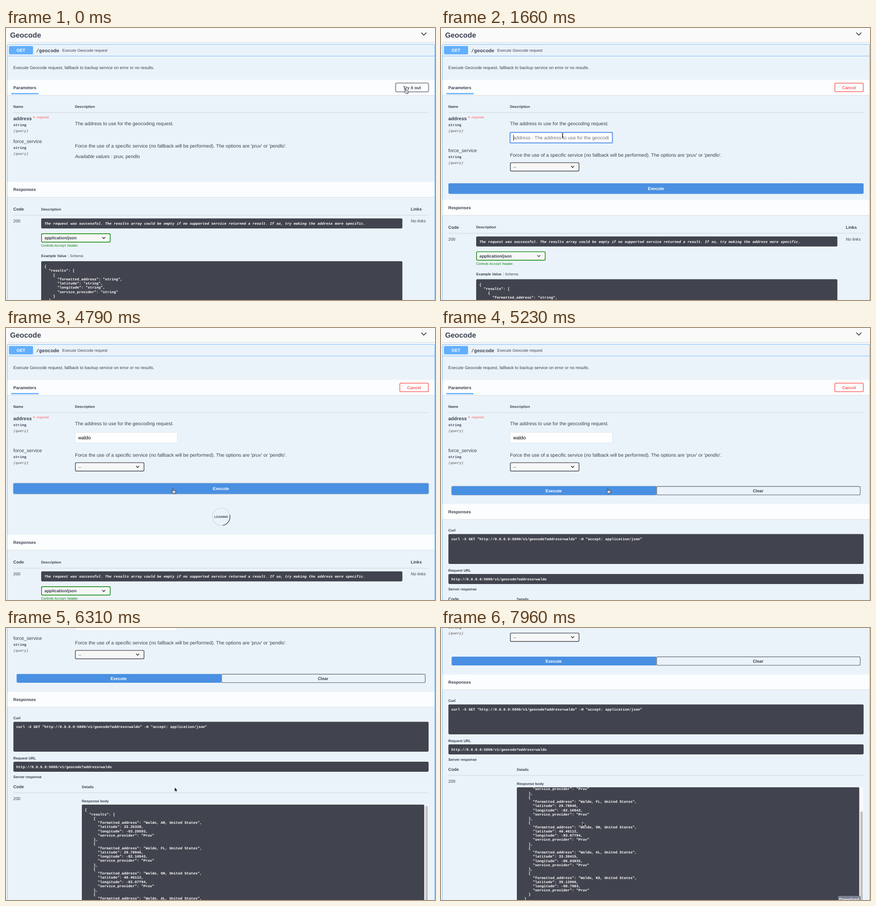
Write an HTML page that moves like this. It is 939x596 px and loops after 8000 ms.

```html
<!DOCTYPE html>
<html lang="en">
<head>
<meta charset="utf-8">
<title>Geocode API docs</title>
<style>
  html, body { margin: 0; width: 100%; height: 100%; overflow: hidden; background: #fafafa; }
  svg { display: block; width: 100%; height: 100%; }
  text { font-family: "Liberation Sans", Arial, sans-serif; fill: #3b4151; white-space: pre; text-rendering: geometricPrecision; }
  .b { font-weight: 700; }
  .i { font-style: italic; }
  .m { font-family: "Liberation Mono", "Courier New", monospace; }
  .c { text-anchor: middle; }
  .white { fill: #fff; }
  .green { fill: #008000; }
  .red { fill: #ff6060; }
  .grey { fill: #808080; }
  .glow { filter: drop-shadow(0 0 1px rgba(40, 50, 70, .55)); }
</style>
</head>
<body>
<svg id="stage" viewBox="0 0 939 596"></svg>
<script>
const LOOP = 8000;
const TINY = 7.26, SMALL = 7.92, BASE = 9.24, LARGE = 10.56, LEAD = 9.24;
const INK = '#3b4151', BLUE = '#61affe', ACTION = '#4990e2', SLATE = '#41444e';

// y is the middle of the capitals
const text = (x, y, str, size = BASE, cls = '') =>
  `<text x="${x}" y="${(y + size * 0.36).toFixed(2)}" font-size="${size}" class="${cls}">${str}</text>`;
const box = (x, y, w, h, fill, extra = '') =>
  `<rect x="${x}" y="${y}" width="${w}" height="${h}" fill="${fill}" ${extra}/>`;
const round = (x, y, w, h, fill, stroke = 'none', sw = 1.3) =>
  box(x, y, w, h, fill, `rx="2.4" stroke="${stroke}" stroke-width="${sw}"`);
const rule = (y, color = 'rgba(59,65,81,.22)', x1 = 16, x2 = 925) =>
  box(x1, y, x2 - x1, 0.8, color);
const chevron = (x, y, w, h, sw) =>
  `<path d="M${x - w} ${y - h}L${x} ${y + h}L${x + w} ${y - h}" fill="none" stroke="#222" stroke-width="${sw}" stroke-linecap="round" stroke-linejoin="round"/>`;
const code = (x, y, lines) =>
  lines.map((line, i) => text(x, y + i * LEAD, line, SMALL, 'm b white')).join('');
const group = (id, body, attrs = '') => `<g id="${id}" ${attrs}>${body}</g>`;

const section = (y, title) =>
  box(3.2, y, 934.6, 33.6, '#fbfdfe') + rule(y + 33.4, 'rgba(0,0,0,.13)', 3.2, 937.8) +
  text(16, y + 16.8, title, BASE, 'b');

const param = (y, name, cls = '') =>
  text(16, y, name, LARGE, cls) + text(16, y + 14.2, 'string', SMALL, 'm b') +
  text(16, y + 27, '(query)', SMALL, 'm b i grey');

const select = (y, label, x, stroke, cls) =>
  round(x + 0.7, y - 9.2, 150.4, 18.4, '#f7f7f7', stroke, 1.4) +
  text(x + 7.3, y, label, BASE, cls) + chevron(x + 137, y, 2.9, 1.5, 1.3);

const forceService = y =>
  param(y, 'force_service') +
  text(151, y + 10.6, "Force the use of a specific service (no fallback will be performed). The options are 'pruv' or 'pendlo'.", LARGE);

const button = (x, y, w, label, color, ink) =>
  round(x, y, w, 18.8, 'none', color, 1.5) + text(x + w / 2, y + 9.4, label, BASE, 'b c ' + ink);

const SAMPLE = [
  '{', '  "results": [', '    {',
  '      "formatted_address": "string",', '      "latitude": "string",',
  '      "longitude": "string",', '      "service_provider": "string"',
  '    }', '  ]', '}'];

const responses = y => `<g transform="translate(0 ${y})">` +
  section(0, 'Responses') +
  text(16, 60, 'Code', BASE, 'b') + text(77, 60, 'Description', SMALL, 'b') + text(886, 60, 'Links', BASE, 'b') +
  rule(72.8) + text(16, 85.6, '200') + text(886, 85.6, 'No links', BASE, 'i') +
  round(77, 80.2, 790.6, 22, SLATE) +
  text(84, 91.6, 'The request was successful. The results array could be empty if no supported service returned a result. If so, try making the address more specific.', SMALL, 'm b i white') +
  select(123, 'application/json', 77, '#008000', 'b') +
  text(77, 139.6, 'Controls <tspan class="m">Accept</tspan> header.', TINY, 'green') +
  text(77, 162.4, 'Example Value', SMALL, 'b') + box(136, 158.5, 0.7, 8, 'rgba(59,65,81,.35)') +
  text(140, 162.4, 'Schema', SMALL) +
  round(77, 174, 790.6, 140, SLATE) + code(84, 185.4, SAMPLE) + '</g>';

const PLACES = [
  ['AR', '33.35338', '-93.29593'], ['FL', '29.78946', '-82.16943'],
  ['OH', '40.46112', '-83.07794'], ['AL', '33.39415', '-86.03835'], ['KS', '39.12006', '-98.7983']];
const ANSWER = ['{', '  "results": [',
  ...PLACES.flatMap(([state, lat, lon], i) => [
    '    {', `      "formatted_address": "Waldo, ${state}, United States",`,
    `      "latitude": ${lat},`, `      "longitude": ${lon},`,
    '      "service_provider": "Pruv"', i < PLACES.length - 1 ? '    },' : '    }']),
  '  ]', '}'];

const common =
  text(9, 14.8, 'Geocode', 15.84, 'b') + chevron(914.5, 13.2, 5, 2.6, 1.5) +
  rule(31, 'rgba(59,65,81,.25)', 3, 939) +
  round(2.9, 35.8, 935.5, 1100, '#ebf3fa', BLUE, 0.9) + rule(61.1, BLUE, 3, 938) +
  round(6.4, 39.4, 52.8, 18.4, BLUE) + text(32.6, 48.6, 'GET', BASE, 'b c white') +
  text(66, 48.9, '/geocode', LARGE, 'm b') + text(123, 48.9, 'Execute Geocode request', 8.58) +
  text(16, 86.4, 'Execute Geocode request, fallback to backup service on error or no results.') +
  section(113.7, 'Parameters') + box(11.5, 142.6, 59.8, 2.7, BLUE) +
  text(16, 172.4, 'Name', SMALL, 'b') + text(151, 172.4, 'Description', SMALL, 'b') + rule(184.8) +
  param(198, 'address', 'b') + text(59.5, 197, '*', BASE, 'b red') + text(67, 195.4, 'required', 7.2, 'red') +
  text(151, 208.8, 'The address to use for the geocoding request.', LARGE);

const docs =
  `<g class="glow">${round(853, 120.8, 71.6, 18.8, '#fbfdfe', '#777c86', 1.3)}</g>` +
  text(888.8, 130.3, 'Try it out', BASE, 'b c') + forceService(248) +
  text(151, 281, '<tspan class="i">Available values</tspan> : pruv, pendlo', LARGE) + responses(337);

const form =
  button(862, 120.8, 62.4, 'Cancel', '#ff6060', 'red') +
  round(151.2, 228.8, 223.8, 23, '#fff', '#d5d9de', 0.7) +
  `<rect id="focus" x="151.2" y="228.8" width="224" height="23" rx="1.5" fill="none" stroke="#5b92ec" stroke-width="2"/>` +
  `<text id="value" x="158" y="243.9" font-size="${LARGE}"></text>` +
  `<rect id="caret" y="234" width="0.9" height="13" fill="#000"/>` +
  forceService(268) + select(304.3, '--', 151, '#41444e', '');

const execute =
  group('execute', round(16.2, 340.2, 908.8, 23.3, ACTION)) + text(470.5, 352, 'Execute', BASE, 'b c white');

const loading =
  `<circle cx="471" cy="413.6" r="19.3" fill="none" stroke="rgba(85,85,85,.17)" stroke-width="1.3"/>` +
  `<path id="arc" d="M490.3 413.6A19.3 19.3 0 0 1 471 432.9" fill="none" stroke="rgba(50,55,65,.85)" stroke-width="1.5"/>` +
  text(471, 413.8, 'LOADING', 6.6, 'b c') + responses(453);

const result =
  group('run', round(23.2, 346.8, 448.4, 19.2, ACTION)) + text(246.5, 356.3, 'Execute', BASE, 'b c white') +
  round(471.8, 347.2, 445.8, 18.4, 'none', '#72777f', 1.4) + text(694, 356.3, 'Clear', BASE, 'b c') +
  section(385.8, 'Responses') +
  text(16, 443.2, 'Curl', SMALL, 'b') + round(16.2, 451.4, 908.8, 65.6, SLATE) +
  code(22.6, 462, ['curl -X GET "http://0.0.0.0:5000/v1/geocode?address=waldo" -H "accept: application/json"']) +
  text(16, 530.9, 'Request URL', SMALL, 'b') + round(16.2, 539, 908.8, 22, SLATE) +
  code(22.6, 550.4, ['http://0.0.0.0:5000/v1/geocode?address=waldo']) +
  text(16, 572.5, 'Server response', SMALL, 'b') +
  text(16, 594, 'Code', BASE, 'b') + text(166, 594, 'Details', SMALL, 'b') + rule(606.6) +
  text(16, 619.6, '200') + text(166, 625.2, 'Response body', SMALL, 'b') +
  box(914, 633, 10.4, 264, '#f8f9fb') + round(166, 633, 749.5, 264, SLATE) +
  group('clipped', group('answer', code(172.6, 644.6, ANSWER)), 'clip-path="url(#body)"') +
  `<rect id="thumb" x="918" width="5.2" height="210" rx="2.6" fill="#c1c1c1"/>` +
  round(869.2, 871, 49, 19, '#7d8293') + text(893.6, 878.8, 'Download', BASE, 'b c white');

const pointers =
  group('hand', '<path d="M0 .9C0-.5 2-.5 2 .9L2.2 4.4C2.6 3.5 4 3.6 4.1 4.8C4.7 4 5.8 4.3 5.9 5.3C6.5 4.7 7.7 5 7.7 6.2L7.6 8.4L6.7 10.8H2.3L-.9 7.2C-1.8 6-.7 5.2.4 6.5Z" fill="#fff" stroke="#111" stroke-width=".9" stroke-linejoin="round"/><path d="M3 7V9.2M4.6 7V9.2M6.1 7V9.2" stroke="#111" stroke-width=".6"/>') +
  group('beam', '<path d="M-2-5Q0-5 0-3.8V3.8Q0 5-2 5M2-5Q0-5 0-3.8V3.8Q0 5 2 5M-1.2.9H1.2" fill="none" stroke="#111" stroke-width=".95"/>') +
  group('arrow', '<path d="M0 0V9.6L2.2 7.6L3.7 11L5.2 10.3L3.8 7.1H6.8Z" fill="#000" stroke="#fff" stroke-width=".8" stroke-linejoin="round"/>');

document.getElementById('stage').innerHTML =
  `<defs><clipPath id="body">${box(166, 633, 749.5, 264, '#000')}</clipPath></defs>` +
  group('page', common + group('docs', docs) + group('form', form) +
    group('bar', execute) + group('ready', responses(376.6)) +
    group('loading', loading) + group('result', result)) + pointers;

// Step tracks: [time, value...]
const MODES = [[0, 'docs'], [750, 'ready'], [4640, 'loading'], [5230, 'result']];
const TYPING = [[0, ''], [2710, 'w'], [2860, 'wal'], [3010, 'waldo']];
const CARET = [[0, false], [1660, true], [2110, false], [2560, true], [3460, false]];
const SCROLL = [[0, 0], [5830, 20], [5980, 88], [6130, 178], [6310, 246], [6460, 264],
  [6610, 273], [6760, 278], [6910, 281], [7060, 284]];
const INNER = [[0, 0], [7360, 12], [7510, 34], [7660, 55], [7960, 63.4]];
const POINTER = [[0, 'hand', 873, 133], [1050, 'arrow', 790, 152], [1200, 'arrow', 560, 196],
  [1350, 'arrow', 350, 226], [1510, 'beam', 266, 236], [3610, 'beam', 274, 248],
  [3760, 'arrow', 312, 292], [3910, 'hand', 350, 342], [4050, 'hand', 364, 352],
  [5830, 'hand', 368.6, 349.6], [5980, 'arrow', 369, 349], [6910, 'arrow', 360, 360],
  [7060, 'arrow', 330, 398], [7210, 'arrow', 309.8, 425.4]];
const SPIN = [4640, 4790, 4940, 5090].map(t => [t, (t - 4790) * 0.36 - 12]);

const at = (track, t) => track.reduce((cur, step) => step[0] <= t ? step : cur, track[0]).slice(1);
const el = id => document.getElementById(id);
const show = (id, on) => { el(id).style.display = on ? '' : 'none'; };
const move = (id, x, y) => el(id).setAttribute('transform', `translate(${x} ${y})`);

function render(t) {
  const [mode] = at(MODES, t), [typed] = at(TYPING, t), [inner] = at(INNER, t);
  const [shape, px, py] = at(POINTER, t);

  for (const id of ['docs', 'ready', 'loading', 'result']) show(id, id === mode);
  show('form', mode !== 'docs');
  show('bar', mode === 'ready' || mode === 'loading');
  show('focus', t >= 1660 && t < 4500);
  show('caret', at(CARET, t)[0]);
  el('execute').classList.toggle('glow', t >= 3910);
  el('run').classList.toggle('glow', t < 6130);

  const value = el('value');
  value.textContent = typed || 'address - The address to use for the geocodi';
  value.style.fill = typed ? '#000' : '#757575';
  const caretX = typed ? 158.4 + value.getComputedTextLength() : 158.2;
  el('caret').setAttribute('x', caretX);

  el('arc').setAttribute('transform', `rotate(${at(SPIN, t)[0]} 471 413.6)`);
  move('page', 0, -at(SCROLL, t)[0]);
  move('answer', 0, -inner);
  el('thumb').setAttribute('y', 635.8 + inner * 0.79);

  for (const id of ['hand', 'beam', 'arrow']) show(id, id === shape);
  move(shape, px, py);
}

const start = performance.now();
function tick() {
  render((performance.now() - start) % LOOP);
  requestAnimationFrame(tick);
}
tick();
</script>
</body>
</html>
```
